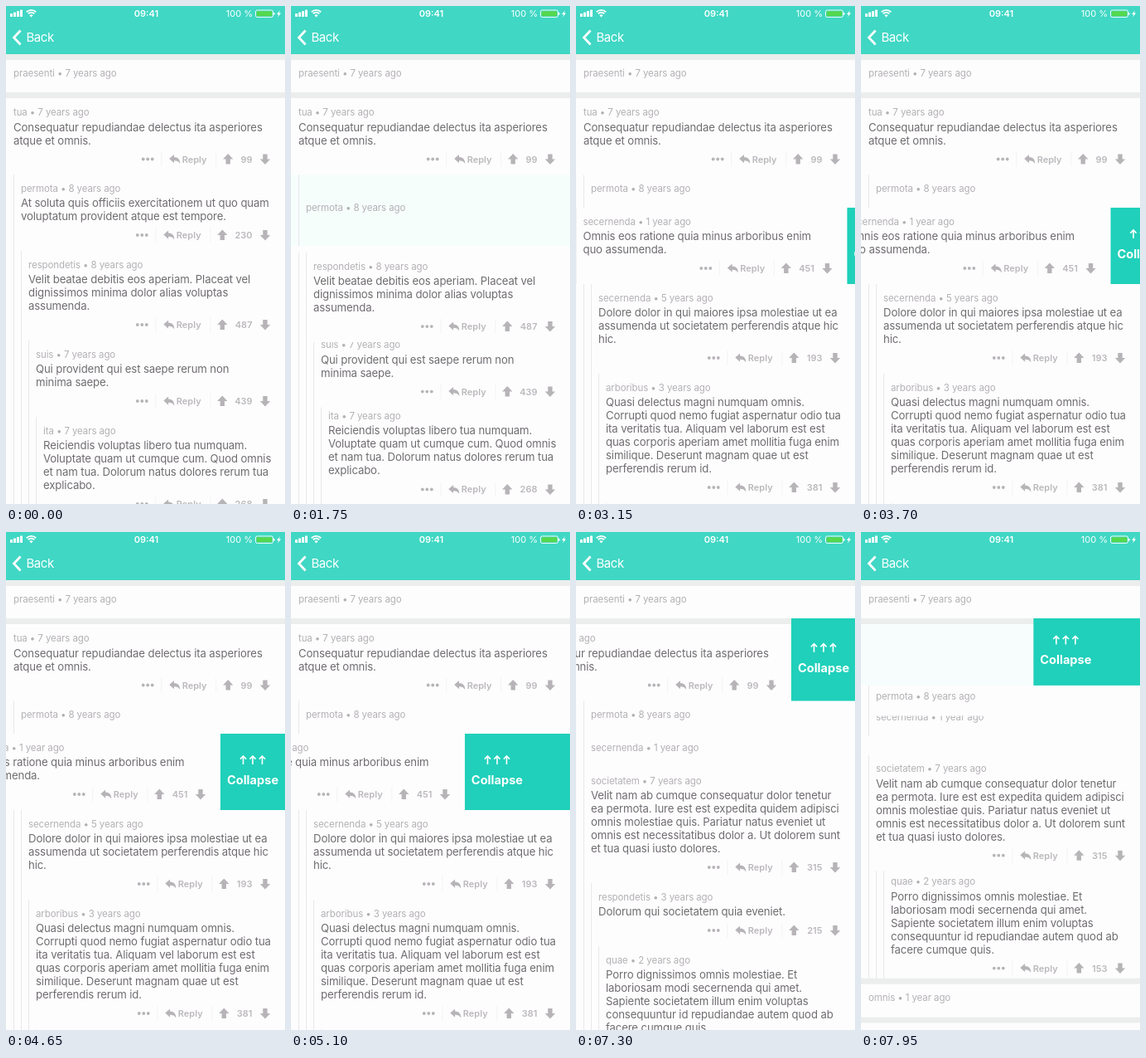
An HTML page that plays this animation: 337x600 px, repeating every 8 s.

```html
<!DOCTYPE html>
<html lang="la">
<head>
<meta charset="utf-8">
<title>Comment thread</title>
<style>
html, body { margin: 0; width: 100%; height: 100%; overflow: hidden; background: #fefdfe; }
svg { display: block; width: 337px; height: 600px; font-family: Inter, Roboto, sans-serif; }
.meta { font-size: 11.5px; letter-spacing: -.1px; fill: #b3b0b4; }
.body { font-size: 13.2px; letter-spacing: -.135px; fill: #6f6c70; }
.act { font-size: 11px; font-weight: 600; fill: #bbb8bc; }
.icon { fill: #b7b4b8; }
.rule { fill: #e9e7e9; }
.sep { fill: #f4f2f4; }
.gap { fill: #ebeeec; }
.paper { fill: #fefdfe; }
.tint { fill: #f5fefc; }
.bar { font-size: 11px; fill: #fff; }
</style>
</head>
<body>
<svg id="stage" viewBox="0 0 337 600" width="337" height="600"></svg>
<script>
const NS = 'http://www.w3.org/2000/svg';
const stage = document.getElementById('stage');
const LOOP = 8000, CLOSED = 40, INDENT = 9, TOP = 111.5;

function add(parent, tag, attrs = {}, text) {
  const el = document.createElementNS(NS, tag);
  for (const k in attrs) el.setAttribute(k, attrs[k]);
  if (text !== undefined) el.textContent = text;
  parent.appendChild(el);
  return el;
}
const rect = (g, x, y, width, height, cls) => add(g, 'rect', { x, y, width, height, class: cls });
const move = (el, x, y) => el.setAttribute('transform', `translate(${x} ${y})`);
const show = (el, on) => el.setAttribute('display', on ? 'inline' : 'none');
const clamp = x => Math.max(0, Math.min(1, x));
const smooth = x => { x = clamp(x); return x * x * (3 - 2 * x); };
const mix = (a, b, p) => a + (b - a) * p;

function actions(g, y, votes) {
  const count = String(votes);
  const ones = count.split('1').length - 1;
  const up = 282 - count.length * 6.9 + ones * 2;
  const a = add(g, 'g', { transform: `translate(0 ${y})` });
  for (const d of [-5.5, 0, 5.5]) add(a, 'circle', { cx: up - 97 + d, cy: 0, r: 1.9, class: 'icon' });
  rect(a, up - 81, -9, 1, 18, 'sep');
  add(a, 'path', {
    class: 'icon', transform: `translate(${up - 71} -5.5)`,
    d: 'M0 5L5.8 0V3C10.5 3 13 5.8 13 11C11.3 8.2 9.3 7.3 5.8 7.3V10.2Z'
  });
  add(a, 'text', { x: up - 55.5, y: 4, class: 'act' }, 'Reply');
  rect(a, up - 15, -9, 1, 18, 'sep');
  const arrow = 'M0 -6.5L6.2 0H2.7V6H-2.7V0H-6.2Z';
  add(a, 'path', { d: arrow, class: 'icon', transform: `translate(${up} 0)` });
  add(a, 'text', { x: 297.5, y: 4, class: 'act', 'text-anchor': 'end' }, count);
  add(a, 'path', { d: arrow, class: 'icon', transform: 'translate(313 0) scale(1 -1)' });
}

function makeRow(depth, user, age, lines = [], votes) {
  const g = add(stage, 'g');
  const height = lines.length ? 60 + 16 * lines.length : CLOSED;
  const paper = rect(g, 0, 0, 337, height, 'paper');
  const tint = rect(g, 0, 0, 337, height, 'tint');
  const slide = add(g, 'g');
  const rules = [];
  for (let k = 1; k <= depth; k++) rules.push(rect(slide, k * INDENT, 0, 1, height, 'rule'));
  const content = add(slide, 'g');
  const x = INDENT * (depth + 1);
  if (user) add(content, 'text', { x, y: 20.5, class: 'meta' }, `${user} • ${age} ago`);
  const body = add(content, 'g');
  lines.forEach((s, i) => add(body, 'text', { x, y: 39 + 16 * i, class: 'body' }, s));
  if (votes) actions(body, 41 + 16 * lines.length, votes);
  return { g, height, paper, tint, slide, rules, content, body };
}

function place(row, y, { h = row.height, closed = false, dx = 0, glow = 0 } = {}) {
  show(row.g, y < 600);
  move(row.g, 0, y);
  for (const r of [row.paper, row.tint, ...row.rules]) r.setAttribute('height', h);
  row.tint.setAttribute('opacity', glow);
  move(row.slide, dx, 0);
  move(row.content, 0, closed ? (h - CLOSED) / 2 : 0);
  show(row.body, !closed);
}

rect(stage, 0, 0, 337, 600, 'paper');

// Later rows come first so that upper rows cover lower ones
const ita = makeRow(4, 'ita', '7 years', ['Reiciendis voluptas libero tua numquam.',
  'Voluptate quam ut cumque cum. Quod omnis', 'et nam tua. Dolorum natus dolores rerum tua', 'explicabo.'], 268);
const suis = makeRow(3, 'suis', '7 years', ['Qui provident qui est saepe rerum non', 'minima saepe.'], 439);
const resp = makeRow(2, 'respondetis', '8 years', ['Velit beatae debitis eos aperiam. Placeat vel',
  'dignissimos minima dolor alias voluptas', 'assumenda.'], 487);

const deep = makeRow(4);
const arbor = makeRow(3, 'arboribus', '3 years', ['Quasi delectus magni numquam omnis.',
  'Corrupti quod nemo fugiat aspernatur odio tua', 'ita veritatis tua. Aliquam vel laborum est est',
  'quas corporis aperiam amet mollitia fuga enim', 'similique. Deserunt magnam quae ut est', 'perferendis rerum id.'], 381);
const reply = makeRow(2, 'secernenda', '5 years', ['Dolore dolor in qui maiores ipsa molestiae ut ea',
  'assumenda ut societatem perferendis atque hic', 'hic.'], 193);

const quae = makeRow(3, 'quae', '2 years', ['Porro dignissimos omnis molestiae. Et',
  'laboriosam modi secernenda qui amet.', 'Sapiente societatem illum enim voluptas',
  'consequuntur id repudiandae autem quod ab', 'facere cumque quis.'], 153);
const short = makeRow(2, 'respondetis', '3 years', ['Dolorum qui societatem quia eveniet.'], 215);
const soc = makeRow(1, 'societatem', '7 years', ['Velit nam ab cumque consequatur dolor tenetur',
  'ea permota. Iure est est expedita quidem adipisci', 'omnis molestiae quis. Pariatur natus eveniet ut',
  'omnis est necessitatibus dolor a. Ut dolorem sunt', 'et tua quasi iusto dolores.'], 315);

const sec = makeRow(1, 'secernenda', '1 year', ['Omnis eos ratione quia minus arboribus enim',
  'quo assumenda.'], 451);
const perm = makeRow(1, 'permota', '8 years', ['At soluta quis officiis exercitationem ut quo quam',
  'voluptatum provident atque est tempore.'], 230);
const tua = makeRow(0, 'tua', '7 years', ['Consequatur repudiandae delectus ita asperiores', 'atque et omnis.'], 99);
const next = makeRow(0, 'omnis', '1 year');
rect(next.g, 0, -7, 337, 7, 'gap');
rect(next.g, 0, CLOSED, 337, 7, 'gap');
rect(next.g, 0, CLOSED + 7, 337, 600, 'paper');

const first = makeRow(0, 'praesenti', '7 years');
place(first, 64.5);
rect(stage, 0, 57, 337, 8, 'gap');
rect(stage, 0, 104, 337, 7, 'gap');

// Swipe panel
const panel = add(stage, 'g');
const plate = add(panel, 'rect', { width: 337, fill: '#20d0ba' });
const label = add(panel, 'g');
for (const x of [27.5, 39, 50.5]) add(label, 'path', {
  d: `M${x} -9V-19M${x - 3.6} -15.4L${x} -19L${x + 3.6} -15.4`,
  fill: 'none', stroke: '#fff', 'stroke-width': 1.6
});
add(label, 'text', { x: 39, y: 15, 'text-anchor': 'middle', fill: '#fff', 'font-size': 14.6, 'font-weight': 700 }, 'Collapse');

function swipe(left, y, h) {
  show(panel, left < 337);
  move(panel, left, y);
  plate.setAttribute('height', h);
  move(label, 0, h / 2);
}

// Status and title bars
rect(stage, 0, 0, 337, 58, '').setAttribute('fill', '#40d7c4');
[4, 5.5, 7, 8.5].forEach((h, i) => add(stage, 'rect', { x: 5 + 4 * i, y: 13 - h, width: 3, height: h, rx: .6, fill: '#fff' }));
for (const r of [8.2, 5.3]) add(stage, 'path', {
  d: `M${30.5 - r * .7} ${13 - r * .7}A${r} ${r} 0 0 1 ${30.5 + r * .7} ${13 - r * .7}`,
  fill: 'none', stroke: '#fff', 'stroke-width': 1.8
});
add(stage, 'path', { d: 'M30.5 13.4L28.4 11.2A3 3 0 0 1 32.6 11.2Z', fill: '#fff' });
add(stage, 'text', { x: 169.5, y: 13, class: 'bar', 'text-anchor': 'middle', 'font-weight': 600 }, '09:41');
add(stage, 'text', { x: 298, y: 13, class: 'bar', 'text-anchor': 'end' }, '100 %');
add(stage, 'rect', { x: 301.5, y: 5, width: 21, height: 8.5, rx: 2, fill: 'none', stroke: '#fff', 'stroke-width': .9 });
add(stage, 'rect', { x: 302.7, y: 6.2, width: 18.6, height: 6.1, rx: 1, fill: '#55d84f' });
add(stage, 'rect', { x: 323.2, y: 7.8, width: 1.3, height: 3, rx: .6, fill: '#fff' });
add(stage, 'path', { d: 'M331 5.2L327 10H329.3L328 13.5L332.2 8.4H329.8Z', fill: '#fff' });
add(stage, 'path', { d: 'M17.5 29.5L9.5 38L17.5 46.5', fill: 'none', stroke: '#fff', 'stroke-width': 2.8 });
add(stage, 'text', { x: 24.5, y: 43.3, 'font-size': 15, 'letter-spacing': -.45, fill: '#fff' }, 'Back');

const FOLD = [1750, 5200, 7900];
const PULL = 153;

const fold = (t, i) => t < FOLD[i] ? 0 : smooth((t - FOLD[i] + 50) / 250);
const release = (t, i) => PULL * (1 - smooth((t - FOLD[i] + 50) / 400));

function pullSecond(t) {
  if (t < 2950 || t >= 5600) return 0;
  if (t < 4950) return 78 * clamp((t - 2950) / 1650);
  return t < FOLD[1] ? mix(78, PULL, smooth((t - 4950) / 250)) : release(t, 1);
}
function pullRoot(t) {
  if (t < 7050) return 0;
  if (t < 7300) return 77 * (t - 7050) / 250;
  return t < FOLD[2] ? mix(77, PULL, smooth((t - 7300) / 550)) : release(t, 2);
}

function owner(row, y, t, i, dx = 0) {
  const p = fold(t, i), closed = t >= FOLD[i];
  const h = mix(row.height, CLOSED, p);
  place(row, y, { h, closed, dx, glow: closed ? 1 - p : 0 });
  return h;
}

// Stacks rows from y; each drifts at its own rate while p runs
function stack(rows, y, p, drift, gone) {
  rows.forEach((row, i) => {
    place(row, gone ? 999 : y + drift[i] * p);
    y += row.height;
  });
}

function draw(t) {
  const [a, b, c] = FOLD.map((_, i) => fold(t, i));
  const pull2 = pullSecond(t), pull0 = pullRoot(t);

  const rootH = owner(tua, TOP, t, 2, -pull0);
  owner(perm, 203 - 60 * c, t, 0);
  stack([resp, suis, ita], 295, a, [19, -106, -163], a === 1);

  const y2 = mix(900, 243, a) - 102 * c;
  const h2 = owner(sec, y2, t, 1, -pull2);
  stack([reply, arbor, deep], mix(992, 335, a), b, [20, -110, -170], b === 1);

  stack([soc, short, quae], mix(800, 283, b), c, [-40, 0, -264], b === 0);
  if (c) show(short.g, false);
  place(next, c ? mix(760, 158, c) : 999);

  if (pull0) swipe(337 - pull0, 104, rootH + TOP - 104);
  else swipe(337 - pull2, y2, h2);
}

const start = performance.now();
function tick() {
  draw((performance.now() - start) % LOOP);
  requestAnimationFrame(tick);
}
draw(0);
requestAnimationFrame(tick);
</script>
</body>
</html>
```
